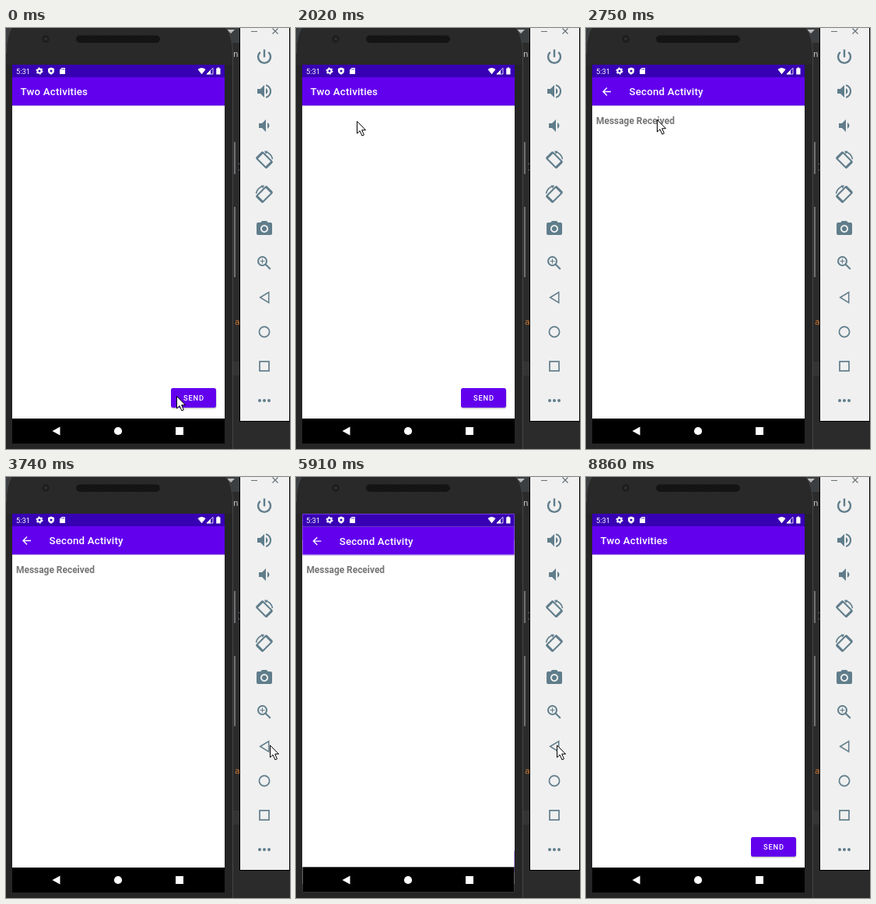
Animation, 365 px wide and 539 px high, one loop 9.39 s. Source, as an HTML page:

```html
<!DOCTYPE html>
<html lang="en">
<head>
<meta charset="utf-8">
<title>Two Activities</title>
<style>
  html, body { margin: 0; width: 100%; height: 100%; overflow: hidden; background: #2b2b2b; }
  svg { display: block; width: 365px; height: 539px; }
  text { font-family: Roboto, "Noto Sans", sans-serif; }
  .title { font-size: 13.27px; font-weight: 500; fill: #fff; letter-spacing: .2px; }
  .line { fill: none; stroke: #607d8b; stroke-width: 2; }
  .code { font-family: "DejaVu Sans Mono", monospace; font-size: 11px; }
</style>
</head>
<body>
<svg viewBox="0 0 365 539">
  <defs>
    <clipPath id="screen"><rect x="8" y="47" width="273" height="485"/></clipPath>
    <pattern id="grille" width="4" height="4" patternUnits="userSpaceOnUse">
      <rect width="4" height="4" fill="#111"/>
      <path d="M0 1h1M2 3h1" stroke="#292929"/>
    </pattern>
    <g id="window">
      <rect x="8" y="47" width="273" height="485" fill="#fff"/>
      <rect x="8" y="63" width="273" height="36" fill="#6200ee"/>
      <rect x="8" y="99" width="273" height="1" fill="#b9a3e0"/>
      <rect x="8" y="47" width="273" height="16" fill="#3700b3"/>
      <rect x="8" y="500" width="273" height="32"/>
    </g>
    <g id="rotate">
      <g transform="rotate(45)">
        <rect x="-9" y="-5.5" width="18" height="11" rx="1" class="line"/>
        <path d="M-8-5.500v11M8-5.500v11" class="line"/>
      </g>
      <path d="M1-10.500A11 11 0 0 1 10.500-1" class="line" style="stroke-width:1.6"/>
      <path d="M0-11.500h4.500l-2.500 4z" fill="#607d8b"/>
    </g>
  </defs>

  <!-- editor behind the phone -->
  <rect width="365" height="539" fill="#2b2b2b"/>
  <rect width="300" height="19" fill="#3c3f41"/>
  <path d="M284 2h10l-5 5z" fill="#bbb"/>
  <text x="292" y="37" class="code" fill="#c9c9c9">n</text>
  <text x="297" y="181" class="code" fill="#8f93c0">)</text>
  <rect x="291" y="427" width="9" height="18" fill="#343434"/>

  <!-- phone -->
  <path d="M7 0Q0 12 0 32V539H292V32Q292 12 283 0Z" fill="#292929"/>
  <path d="M7 0Q0 12 .5 32M283 0Q291.500 12 291.500 32V539" fill="none" stroke="#454547"/>
  <path d="M0 47H8V532H281V47H290V539H0Z" fill="#252525"/>
  <path d="M294 146v41M294 229v90" stroke="#6f7172" stroke-width="2"/>
  <text x="294" y="380" class="code" fill="#cc7832">a</text>
  <rect x="90" y="9.500" width="108" height="9.500" rx="4.700" fill="url(#grille)"/>
  <circle cx="51" cy="14" r="4.700" fill="#1d1d1d"/>
  <circle cx="51" cy="14" r="2" fill="#303036"/>

  <g clip-path="url(#screen)">
    <g id="first">
      <use href="#window"/>
      <text x="18.500" y="86.300" class="title">Two Activities</text>
      <rect x="212" y="462" width="58.500" height="25.500" rx="3" opacity=".22"/>
      <rect x="212" y="461" width="58" height="25" rx="2.700" fill="#6200ee"/>
      <text x="241.400" y="477" text-anchor="middle" fill="#fff" font-size="9.300" font-weight="500" letter-spacing=".83">SEND</text>
    </g>
    <g id="second">
      <use href="#window"/>
      <path d="M32 81.500H22M27 76.500l-5 5 5 5" fill="none" stroke="#fff" stroke-width="1.400"/>
      <text x="55.500" y="86.300" class="title">Second Activity</text>
      <text x="13" y="123" fill="#757575" font-size="11.950" font-weight="700">Message Received</text>
    </g>
  </g>

  <!-- system bars -->
  <g fill="#fff">
    <text x="13" y="58.500" font-size="9.300">5:31</text>
    <circle cx="43" cy="55" r="2.500" fill="none" stroke="#fff" stroke-width="2"/>
    <circle cx="43" cy="55" r="3.900" fill="none" stroke="#fff" stroke-width="1.300" stroke-dasharray="2.040"/>
    <path d="M58 50.500l4 1.500v3q0 3-4 4.700-4-1.700-4-4.700v-3z"/>
    <circle cx="58" cy="55" r="1.500" fill="#3700b3"/>
    <path d="M71.500 51H76v8H69v-5.500z"/>
    <path d="M71.800 52v1.500M73.300 52v1.500M74.800 52v1.500" stroke="#3700b3" stroke-width=".7"/>
    <path d="M246.500 53q5-4 10 0l-5 6.300z"/>
    <path d="M263 53.800V59.300H257.500z"/>
    <path d="M266 51.300V59H258z" fill="none" stroke="#fff" stroke-width=".8"/>
    <path d="M271.700 50.500h2.300v1h1.500v8h-5.300v-8h1.500z"/>
    <path d="M59.500 516l10-5.600v11.200z"/>
    <circle cx="144" cy="516" r="5.100"/>
    <rect x="218" y="511" width="10" height="10"/>
  </g>

  <!-- emulator toolbar -->
  <rect x="300" y="-1" width="65" height="505"/>
  <rect x="301" width="63" height="503" fill="#f0f0f0"/>
  <rect id="press" x="313" y="328" width="38" height="34" fill="#dce2e5"/>
  <path d="M315 4.500h8M342.500.5l7 7M349.500.5l-7 7" stroke="#687278" stroke-width="1.200"/>
  <path d="M326.800 30.800a8 8 0 1 0 10.400 0M332 27.500v10" class="line" style="stroke-width:2.4"/>
  <g fill="#607d8b">
    <path transform="translate(320 69)" d="M3 9v6h4l5 5V4L7 9zM16.500 12q0-2.700-2.500-4v8q2.500-1.300 2.500-4zM14 3.200v2.100a7 7 0 0 1 0 13.400v2.100a9 9 0 0 0 0-17.600z"/>
    <path transform="translate(320 113)" d="M5 9v6h4l5 5V4L9 9zM18.500 12q0-2.700-2.500-4v8q2.500-1.300 2.500-4z"/>
    <path transform="translate(320 245)" fill-rule="evenodd" d="M9 2L7.200 4H4q-2 0-2 2v12q0 2 2 2h16q2 0 2-2V6q0-2-2-2h-3.200L15 2zM12 7a5 5 0 1 0 .01 0zM12 8.800a3.200 3.200 0 1 1-.01 0z"/>
  </g>
  <use href="#rotate" transform="translate(332 169)"/>
  <use href="#rotate" transform="translate(332 213) scale(-1 1)"/>
  <g class="line">
    <circle cx="329.500" cy="298.500" r="5.500"/>
    <path d="M333.500 302.500l6.300 6.300"/>
    <path d="M326.500 298.500h6M329.500 295.500v6" stroke-width="1.100"/>
    <path d="M326.700 345l11-6.700v13.400z" stroke-width="1.500"/>
    <circle cx="332" cy="389" r="6.600" stroke-width="1.700"/>
    <rect x="326" y="427" width="12" height="12" stroke-width="1.700"/>
    <path d="M326 477h12.100" stroke-width="4" stroke-linecap="round" stroke-dasharray="0 6"/>
  </g>

  <path id="cursor" d="M.5.500V16l3.600-3.300 2.800 6.300 2.500-1.100-2.700-6.200H11.500z" fill="#fff" stroke="#000"/>
</svg>
<script>
const LOOP = 9390, STEP = 130, FIRST_STEP = 140;
const OPEN = 2150, OPENED = 2270, CLOSE = 5910, CLOSED = 6210;
const PRESS = 5470, RELEASE = 5590, LEAVE = 8860;
const el = id => document.getElementById(id);
const [first, second, press, cursor] = ["first", "second", "press", "cursor"].map(el);

const start = { x: 219, y: 471 };
const send = { x: 239, y: 476 };
const back = { x: 339, y: 343 };
const moves = [
  { from: 100, to: 420, x: 103, y: 482 },
  { from: 420, to: 1060, ...send },
  { from: 1300, to: 1950, x: 78, y: 119 },
  { from: 2200, to: 2620, x: 91, y: 117 },
  { from: 3100, to: 3600, ...back },
  { from: 3860, to: 4060, x: 341, y: 408 },
  { from: 4060, to: 4400, x: 335, y: 343 },
  { from: 6600, to: 7050, ...send },
  { from: 7750, to: 8730, x: 8, y: 115 }
];

const between = (t, from, to) => t >= from && t < to;
const mix = (a, b, k) => a + (b - a) * k;
const ease = k => k * k * (3 - 2 * k);

const stepped = t =>
  Math.max(0, FIRST_STEP + Math.floor((t - FIRST_STEP) / STEP) * STEP);

function pointerAt(t) {
  return moves.reduce((p, m) => {
    const k = ease(Math.min(1, Math.max(0, (t - m.from) / (m.to - m.from))));
    return { x: mix(p.x, m.x, k), y: mix(p.y, m.y, k) };
  }, start);
}

function pose(node, scale, opacity = 1) {
  node.setAttribute("transform",
    `translate(144.5 289.5) scale(${scale}) translate(-144.5 -289.5)`);
  node.setAttribute("opacity", opacity);
}

const show = (node, visible) => node.setAttribute("opacity", visible ? 1 : 0);

function draw(t) {
  const opening = between(t, OPEN, OPENED);
  const closing = between(t, CLOSE, CLOSED);
  pose(first, opening ? 1.045 : closing ? 1.1 : 1);
  pose(second, opening ? 0.92 : closing ? 0.997 : 1,
    opening ? 0.65 : between(t, OPEN, CLOSED) ? 1 : 0);
  show(press, between(t, PRESS, RELEASE));
  show(cursor, t < LEAVE);
  const { x, y } = pointerAt(stepped(t));
  cursor.setAttribute("transform", `translate(${Math.round(x)} ${Math.round(y)})`);
}

const began = performance.now();
function tick() {
  draw((performance.now() - began) % LOOP);
  requestAnimationFrame(tick);
}
tick();
</script>
</body>
</html>
```
